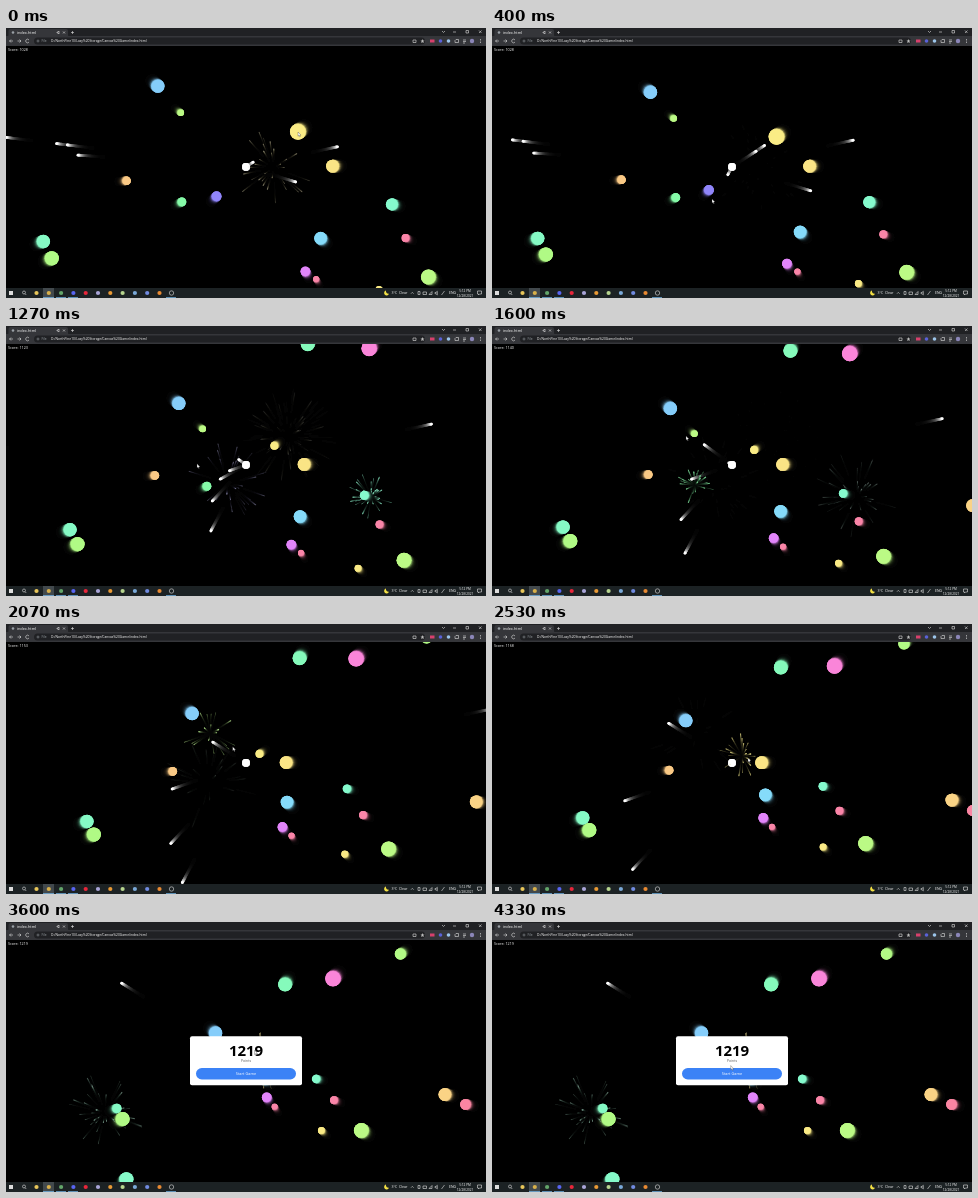
Animation of 480 by 270 pixels, one loop 4390 ms. Source, as an HTML page with a canvas:

```html
<!DOCTYPE html>
<html lang="en">
<head>
<meta charset="utf-8">
<title>index.html</title>
<style>
  html, body { margin: 0; width: 100%; height: 100%; overflow: hidden; background: #000; }
  canvas, svg { position: absolute; left: 0; top: 0; width: 100%; height: 100%; }
  text { font-family: "Open Sans", "Noto Sans", sans-serif; font-size: 3.5px; fill: #fff; }
  .mid { text-anchor: middle; }
  .line { fill: none; stroke: #ddd; stroke-width: .6; }
</style>
</head>
<body>
<canvas id="game" width="480" height="270"></canvas>
<svg viewBox="0 0 480 270" preserveAspectRatio="none">
  <text id="score" x="2" y="23.4" style="font-size:3.7px"></text>

  <rect width="480" height="9" fill="#202124"/>
  <path d="M1 9Q2.5 9 2.5 7V3Q2.5 1 4.5 1H60Q62 1 62 3V7Q62 9 64 9Z" fill="#35363a"/>
  <rect y="8" width="480" height="10" fill="#35363a"/>
  <rect x="28" y="9.5" width="391" height="7" rx="3.5" fill="#202124"/>
  <circle cx="7" cy="4.5" r="1.3" fill="#9aa0a6"/>
  <text x="11" y="5.7" style="font-size:3.9px">index.html</text>
  <path class="line" d="M51 4h1l1-1v3l-1-1h-1zM57 3.5l2 2m0-2l-2 2M65 4.5h3m-1.5-1.5v3M436 3l1.5 1.500L439 3M447 4h3M460 2.5h2.500V5H460zM473 2.5l2.500 2.500m0-2.500L473 5"/>
  <path class="line" d="M7 13H3.500l1.500-1.500M3.500 13l1.500 1.500M11.500 13H15l-1.500-1.500M15 13l-1.500 1.500M23 12a1.800 1.800 0 1 0 0 2M407 12h3v2.500h-3zM450 11.500h2.500v3H449v-2zM457 12h3m-3 1.500h3m-3 1.500h2"/>
  <path d="M416.500 11l.6 1.400 1.400.1-1.100 1 .4 1.500-1.300-.8-1.300.8.400-1.500-1.100-1 1.400-.1z" fill="#bbb"/>
  <circle cx="32" cy="13" r="1" fill="none" stroke="#9aa0a6" stroke-width=".5"/>
  <text x="35.5" y="14.3" style="font-size:3.3px;fill:#9aa0a6">File</text>
  <text x="45" y="14.3" style="font-size:3.3px">D:/NorthPine10/Lazy%20Storage/Canvas%20Game/index.html</text>
  <rect x="424" y="11.5" width="4.5" height="3" fill="#d7406c"/>
  <circle cx="434.5" cy="13" r="1.8" fill="#5a62d8"/>
  <circle cx="442.5" cy="13" r="1.8" fill="#9cc5ea"/>
  <circle cx="466" cy="13" r="2.2" fill="#8b86b8"/>
  <path d="M474.5 11v4" stroke="#ddd" stroke-width=".8" stroke-dasharray=".8"/>

  <rect y="260" width="480" height="10" fill="#1c2224"/>
  <rect x="37" y="260" width="11" height="10" fill="#42494d"/>
  <path d="M37 269.6h11M50 269.6h10M62 269.6h10M160 269.6h10" stroke="#76b9ed" stroke-width=".8"/>
  <rect x="3" y="263" width="4" height="4" fill="#ddd"/>
  <g id="icons"></g>
  <circle class="line" cx="18" cy="264.5" r="1.5"/>
  <path class="line" d="M19 265.700l1.300 1.300M405 265.700l1.300-1.300 1.300 1.300M412 263.500h2v3h-2zM417 264h3.500v2.500H417zM423 266.500l3-3v3zM429 264.500h1l1.300-1.200v3.600l-1.300-1.200h-1zM435.500 267l3-4M471.500 263h4v3h-2l-1 1v-1h-1z"/>
  <circle class="line" cx="165.5" cy="265" r="2.2"/>
  <path d="M380 262.600a2.500 2.500 0 1 0 3 3.200 2.600 2.600 0 0 1-3-3.200" fill="#f3e044"/>
  <text x="385.5" y="266.3">3°C&#160; Clear</text>
  <text x="443" y="266.3">ENG</text>
  <text class="mid" x="459" y="264" style="font-size:3.1px">5:12 PM</text>
  <text class="mid" x="459" y="268.6" style="font-size:3.1px">12/28/2021</text>

  <g id="modal">
    <rect x="184" y="114.3" width="112" height="49" rx="2" fill="#fff"/>
    <text class="mid" x="240" y="134.3" style="font-size:15px;font-weight:700;fill:#000">1219</text>
    <text class="mid" x="240" y="139.8" style="fill:#555">Points</text>
    <rect x="190" y="146" width="100" height="11.5" rx="5.75" fill="#3b82f6"/>
    <text class="mid" x="240" y="153.2" style="font-size:3.9px">Start Game</text>
  </g>
  <path id="cursor" d="M0 0V4.200L1 3.300L1.700 4.800L2.300 4.500L1.700 3.100H3Z" fill="#fff" stroke="#222" stroke-width=".3"/>
</svg>
<script>
const LOOP = 4390, OVER = 3480, STEP = 1000 / 15, TICK = 7.5;
const CX = 240, CY = 138.9, SLOW = 0.0225, FAST = 0.076, REF = 1600;
const SHOT_R = 1.4, LIFE = 700, DRAG = 1700;
const $ = id => document.getElementById(id);
const ctx = $('game').getContext('2d');

// Every enemy runs straight at the player: angle, distance at time REF, radius, hue.
const enemies = [
  [222.5, 83.4, 6.6, 203], [159.8, 179.8, 6.6, 153], [154.8, 178.5, 7, 98], [173.4, 84.1, 4.3, 35],
  [219.7, 48.7, 3.3, 92], [151.4, 36.9, 4.4, 138], [135, 5.5, 4.9, 246], [-34.1, 26.6, 7.9, 53],
  [-0.5, 50.5, 6.4, 49], [14.4, 114.6, 6, 157], [24, 138.5, 3.9, 342], [43.7, 67.1, 6.3, 196],
  [60.4, 84.1, 4.8, 288], [58, 96.2, 3, 342], [31.1, 176.9, 7.4, 92], [42.7, 144.8, 3.4, 52],
  [-43.4, 161.9, 7.7, 317], [-62.9, 128, 6.9, 148], [-34.7, 230, 5.6, 97], [9.6, 243.9, 6.4, 40],
  [11.2, 266, 5.4, 345], [135.3, 210.4, 7, 155], [2, -21, 5, 50]
].map(([deg, dist, r, hue]) => ({ deg, dist, r, hue, hits: [], end: 1e9 }));

// launch time, angle
const shots = [
  [-3180, 187], [-2512, 187], [-2370, 187], [-2217, 184], [-1233, -12.4], [-839, 2],
  [-683, 16.9], [-113, -33.3], [21, -33], [282, 118], [430, 137], [615, 133], [880, 151],
  [1035, 160.5], [1148, 216], [1550, 212], [2150, -34], [2980, 0]
].map(([born, deg]) => ({ born, deg, end: 1e9 }));

let seed = 7;
const rand = () => (seed = seed * 16807 % 2147483647) / 2147483647;
const polar = (deg, d) => [CX + d * Math.cos(deg * Math.PI / 180), CY + d * Math.sin(deg * Math.PI / 180)];
const enemyAt = (e, t) => polar(e.deg, e.dist + (REF - t) * SLOW);
const shotAt = (s, t) => polar(s.deg, (t - s.born) * FAST);

// Play the game once: hits shrink large enemies, kill small ones and throw sparks.
const particles = [], gains = [];

function hit(e, t) {
  const [x, y] = enemyAt(e, t);
  gains.push({ t, points: Math.round(e.r * 3.9) });
  for (let i = 0; i < e.r * 6; i++) {
    const speed = 0.086 * (0.2 + 0.8 * rand());
    particles.push({ t, x, y, hue: e.hue, deg: rand() * 360, speed, r: 0.3 + rand() * 0.35 });
  }
  if (e.r > 5) {
    e.hits.push({ t, loss: e.r * 0.3 });
    e.r *= 0.7;
  } else e.end = t;
}

for (let t = -3200; t < OVER; t += 4) {
  for (const s of shots) {
    if (t < s.born || t > s.end) continue;
    const [x, y] = shotAt(s, t);
    if (x < -5 || x > 485 || y < 17 || y > 261) s.end = t;
    const e = enemies.find(e => {
      const [ex, ey] = enemyAt(e, t);
      return t < e.end && Math.hypot(ex - x, ey - y) < e.r + SHOT_R;
    });
    if (e) {
      hit(e, t);
      s.end = t;
    }
  }
}

function disc([x, y], r, color) {
  ctx.fillStyle = color;
  ctx.beginPath();
  ctx.arc(x, y, r, 0, 7);
  ctx.fill();
}

function drawWorld(t) {
  disc([CX, CY], 3.8, '#fff');
  for (const p of particles) {
    const age = t - p.t;
    if (age < 0 || age > LIFE) continue;
    const [dx, dy] = polar(p.deg, p.speed * DRAG * (1 - Math.exp(-age / DRAG)));
    const fade = 1 - (age / LIFE) ** 2;
    ctx.globalAlpha = 0.8 * fade;
    disc([p.x + dx - CX, p.y + dy - CY], p.r, `hsl(${p.hue} ${80 * fade}% 72%)`);
  }
  ctx.globalAlpha = 1;
  for (const s of shots)
    if (t >= s.born && t < s.end) disc(shotAt(s, t), SHOT_R, '#fff');
  for (const e of enemies) {
    if (t >= e.end) continue;
    const extra = e.hits.reduce((sum, h) => sum + h.loss * Math.exp(Math.min(0, h.t - t) / 150), 0);
    disc(enemyAt(e, t), e.r + extra, `hsl(${e.hue} 92% 75%)`);
  }
}

// Replay the recent ticks so that each leaves its fading trail.
function drawGame(t) {
  ctx.fillStyle = '#000';
  ctx.fillRect(0, 0, 480, 270);
  for (let i = 45; i >= 0; i--) {
    ctx.fillStyle = 'rgba(0,0,0,.1)';
    ctx.fillRect(0, 0, 480, 270);
    drawWorld(t - i * TICK);
  }
}

const pointer = [[0, 292, 104], [400, 220, 171], [930, 188, 166], [1600, 194, 110],
  [2500, 256, 134], [3800, 248, 128], [LOOP, 238.5, 144]];

function pointerAt(t) {
  const i = pointer.findIndex(p => p[0] > t);
  const [t0, x0, y0] = pointer[i - 1], [t1, x1, y1] = pointer[i];
  const f = (t - t0) / (t1 - t0), e = f * f * (3 - 2 * f);
  return [x0 + (x1 - x0) * e, y0 + (y1 - y0) * e];
}

const iconColors = ['#e8c65a', '#d8b04a', '#63a66a', '#5865f2', '#e8263a', '#a9a5d8',
  '#e99a35', '#b7d58f', '#7aa9d8', '#718be0', '#e98a32'];
$('icons').innerHTML = iconColors.map((color, i) =>
  `<circle cx="${30.5 + i * 12.3}" cy="265" r="2.1" fill="${color}"/>`).join('');

function frame(now) {
  const t = Math.floor((now % LOOP + 4) / STEP) * STEP;
  const won = gains.filter(g => g.t > 0 && g.t <= t).reduce((sum, g) => sum + g.points, 0);
  drawGame(Math.min(t, OVER));
  $('score').textContent = `Score: ${1028 + won}`;
  $('modal').style.display = t >= OVER - 20 ? '' : 'none';
  $('cursor').setAttribute('transform', `translate(${pointerAt(Math.min(t, LOOP - 1))})`);
  requestAnimationFrame(frame);
}
requestAnimationFrame(frame);
</script>
</body>
</html>
```
